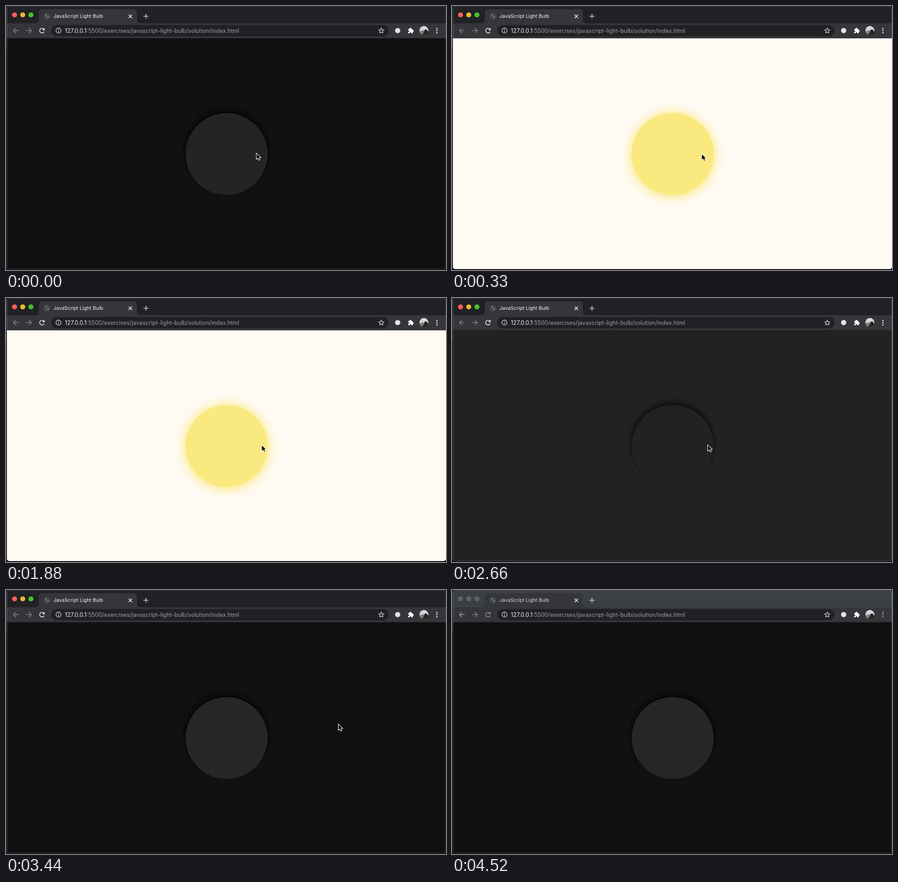
Recreate the animation shown at these times as an HTML page. Size 965 px wide and 580 px high, loop 4.59 s.

```html
<!DOCTYPE html>
<html lang="en">
<head>
<meta charset="utf-8">
<title>JavaScript Light Bulb</title>
<style>
  html, body { margin: 0; width: 100%; height: 100%; overflow: hidden; background: #0d0d11; }
  svg { display: block; width: 965px; height: 580px; }
  text { font-family: Inter, Roboto, sans-serif; }
  .line { fill: none; stroke-linecap: round; stroke-linejoin: round; }
</style>
</head>
<body>
<svg viewBox="0 0 965 580" xmlns="http://www.w3.org/2000/svg">
  <defs>
    <clipPath id="win"><rect x="2" y="0.5" width="963" height="577.5" rx="5"/></clipPath>
    <clipPath id="face"><circle cx="916.5" cy="54" r="10"/></clipPath>
    <radialGradient id="halo" gradientUnits="userSpaceOnUse" cx="484" cy="327" r="116">
      <stop offset=".74" stop-color="#fae97f" stop-opacity=".85"/>
      <stop offset=".8" stop-color="#fae97f" stop-opacity=".55"/>
      <stop offset=".86" stop-color="#fae97f" stop-opacity=".27"/>
      <stop offset=".93" stop-color="#fae97f" stop-opacity=".08"/>
      <stop offset="1" stop-color="#fae97f" stop-opacity="0"/>
    </radialGradient>
    <linearGradient id="sky" x1="0" y1="0" x2="0" y2="1">
      <stop offset="0" stop-color="#e4e4e4"/><stop offset="1" stop-color="#a9a9a9"/>
    </linearGradient>
  </defs>

  <!-- desktop edge -->
  <rect width="965" height="580" fill="#0d0d11"/>
  <rect width="2" height="580" fill="#1b1a29"/>
  <rect width="1.2" height="95" fill="#4b4152"/>

  <g clip-path="url(#win)">
    <rect id="page" x="2" y="70" width="963" height="510"/>

    <g id="off">
      <circle id="rim" cx="484" cy="318" r="96.5"/>
      <circle id="mid" cx="484" cy="319.5" r="92" fill="#161616"/>
      <circle id="lip" cx="484" cy="323.2" r="90.5"/>
    </g>
    <g id="on">
      <circle id="ring" cx="484" cy="326" r="119" fill="#9a9691"/>
      <circle id="glow" cx="484" cy="327" r="116" fill="url(#halo)"/>
    </g>
    <circle id="bulb" cx="484" cy="325" r="90"/>

    <!-- tab strip -->
    <rect id="strip" x="2" y="0" width="963" height="38"/>
    <path d="M64 38Q72 38 72 30V15Q72 7 80 7H279Q287 7 287 15V30Q287 38 295 38Z" fill="#35363a"/>
    <g id="lights"><circle cx="18.7" cy="19.4" r="5.5"/><circle cx="36.7" cy="19.4" r="5.5"/><circle cx="54.7" cy="19.4" r="5.5"/></g>
    <circle cx="89.7" cy="22.4" r="6.3" fill="#5f6368"/>
    <path d="M84.5 20.5Q88 21 88.5 23.5L90 25V28Q85 27 84.5 20.5ZM89 17.2Q94 17.5 94.8 22L91.5 22.5L90 20Z" fill="#393a3e"/>
    <text id="title" x="104" y="26.3" font-size="10.9">JavaScript Light Bulb</text>
    <path class="line" d="M269.3 19.2L276 25.9M276 19.2L269.3 25.9" stroke="#eef0f2" stroke-width="1.5"/>
    <path class="line" d="M302 22.4H312M307 17.4V27.4" stroke="#d2d4d7" stroke-width="1.5"/>

    <!-- toolbar -->
    <rect x="2" y="38" width="963" height="32" fill="#35363a"/>
    <rect x="2" y="70" width="963" height="1" fill="#2a2b2e"/>
    <rect x="99" y="41.7" width="740" height="25" rx="12.5" fill="#202124"/>
    <path id="back" class="line" d="M27 54H16.5M21.3 49L16.3 54L21.3 59" stroke-width="1.5"/>
    <path class="line" d="M45 54H55.5M50.7 49L55.7 54L50.7 59" stroke="#85878b" stroke-width="1.5"/>
    <g id="reload">
      <path class="line" d="M83.2 57A5.1 5.1 0 1 1 82.4 50.3" stroke="currentColor" stroke-width="1.6"/>
      <path d="M84.7 48V53.2H79.5Z" fill="currentColor"/>
    </g>
    <g fill="none" stroke="#e2e4e7" stroke-width="1.3">
      <circle cx="115.1" cy="54" r="5.5"/><path d="M115.1 53.2V57M115.1 50.7V52"/>
    </g>
    <text x="129" y="58.5" font-size="12.5" fill="#9a9da1"><tspan fill="#f1f3f5">127.0.0.1</tspan>:5500/exercises/javascript-light-bulb/solution/index.html</text>
    <path id="star" class="line" stroke="#c9cbce" stroke-width="1.3"/>
    <circle cx="859" cy="54" r="5.8" fill="#e1e3e6"/>
    <path d="M882 50.5H885Q884.7 47.7 886.9 47.7Q889.2 47.7 888.9 50.5H892V53.4Q894.4 53 894.4 55Q894.4 57 892 56.7V60H888.8Q889 57.4 887 57.4Q885 57.4 885.2 60H882V56.8Q884.4 57 884.4 55.2Q884.4 53.4 882 53.6Z" fill="#f1f3f4"/>
    <g clip-path="url(#face)">
      <rect x="906" y="44" width="21" height="20" fill="url(#sky)"/>
      <path d="M906 56L915 54L927 55V64H906Z" fill="#777"/>
      <path d="M913 64Q914 59 918 58Q916 54 919 52Q923 50 924 55L927 58V64Z" fill="#202022"/>
    </g>
    <g id="menu"><circle cx="945" cy="49.2" r="1.5"/><circle cx="945" cy="54" r="1.5"/><circle cx="945" cy="58.8" r="1.5"/></g>
  </g>
  <rect id="frame" x="2.5" y="0.5" width="962" height="577" rx="5" fill="none" stroke="#fff" stroke-opacity=".2"/>

  <g id="cursor">
    <path d="M0.5 1V16L4 13L6 17.5L9 16.3L7.2 12L11.8 11.8Z" fill="#000" opacity=".25"/>
    <path d="M0.7 0.9V14.8L3.9 11.9L6 16.5L8.7 15.4L6.7 10.9L11 10.8Z" fill="#000" stroke="#fff" stroke-width="1.1" stroke-linejoin="round"/>
  </g>
</svg>
<script>
const LOOP = 4590;
const $ = id => document.getElementById(id);
const set = (id, attrs) => { for (const k in attrs) $(id).setAttribute(k, attrs[k]); };
const mix = (a, b, u) => a + (b - a) * u;
const grey = v => `rgb(${v},${v},${v})`;
const smooth = u => u * u * (3 - 2 * u);

// Pointer moves: start, end, number of steps, target, optional bend point
const moves = [
  { from: 240, to: 240, n: 1, end: [547, 324] },
  { from: 480, to: 800, n: 6, end: [627, 223] },
  { from: 1040, to: 1280, n: 5, end: [621, 294] },
  { from: 1580, to: 1880, n: 6, end: [560, 322] },
  { from: 2660, to: 3440, n: 13, end: [728, 293.5], bend: [559, 220] },
  { from: 3610, to: 4030, n: 7, end: [936, 566] },
  { from: 4150, to: 4270, n: 3, end: [936, 582] }
];

function stepOf(t, from, to, n) {
  if (n < 2 || t >= to) return n - 1;
  return Math.floor((t - from) / (to - from) * (n - 1));
}

function pointer(t) {
  let p = [548.3, 322.3];
  for (const m of moves) {
    if (t < m.from) break;
    const u = smooth((stepOf(t, m.from, m.to, m.n) + 0.3) / (m.n - 0.7));
    p = p.map((a, i) => {
      const c = m.bend ? m.bend[i] : (a + m.end[i]) / 2;
      return mix(mix(a, c, u), mix(c, m.end[i], u), u);
    });
  }
  return p;
}

function drawStar() {
  let d = "";
  for (let i = 0; i < 10; i++) {
    const r = i % 2 ? 2.7 : 6.2, a = i * Math.PI / 5 - Math.PI / 2;
    d += (i ? "L" : "M") + (823 + r * Math.cos(a)).toFixed(2) + " " + (54.4 + r * Math.sin(a)).toFixed(2);
  }
  set("star", { d: d + "Z" });
}

function drawBulb(t) {
  const lit = t >= 240 && t < 2660;
  set("on", { visibility: lit ? "visible" : "hidden" });
  set("off", { visibility: lit ? "hidden" : "visible" });
  if (lit) {
    const warming = t < 330;
    set("page", { fill: warming ? "#989690" : "#fffaf2" });
    set("bulb", { fill: warming ? "#e9db7f" : "#fae97f" });
    set("ring", { opacity: warming ? 1 : 0 });
    set("glow", { opacity: warming ? 0.8 : 0.9 });
    return;
  }
  // Remaining light fades quickly after switching off
  const rest = t >= 2660 ? Math.pow(0.25, stepOf(t, 2660, 3140, 8)) : 0;
  set("page", { fill: grey(mix(17, 34, rest)) });
  set("rim", { fill: grey(mix(12, 28, rest)) });
  set("mid", { opacity: rest });
  set("lip", { fill: grey(mix(1, 15, rest)) });
  const cold = t < 240 ? "#242426" : t >= 4520 ? "#242628" : grey(mix(39, 34, rest));
  set("bulb", { fill: cold });
}

function drawWindow(active) {
  set("strip", { fill: active ? "#202124" : "#3c4043" });
  ["#fe5f57", "#e9bb2c", "#48c12e"].forEach((c, i) =>
    $("lights").children[i].setAttribute("fill", active ? c : "#5f6368"));
  set("title", { fill: active ? "#f1f3f5" : "#d5d7da" });
  set("back", { stroke: active ? "#85878b" : "#a2a4a7" });
  set("reload", { color: active ? "#eef0f2" : "#94969a" });
  set("menu", { fill: active ? "#eef0f2" : "#a2a4a7" });
}

function draw(t) {
  drawBulb(t);
  drawWindow(t < 4520);
  const [x, y] = pointer(t);
  set("cursor", {
    transform: `translate(${x.toFixed(2)} ${y.toFixed(2)})`,
    visibility: t < 4270 ? "visible" : "hidden"
  });
}

drawStar();
const start = performance.now();
function tick() {
  draw((performance.now() - start) % LOOP);
  requestAnimationFrame(tick);
}
tick();
</script>
</body>
</html>
```
